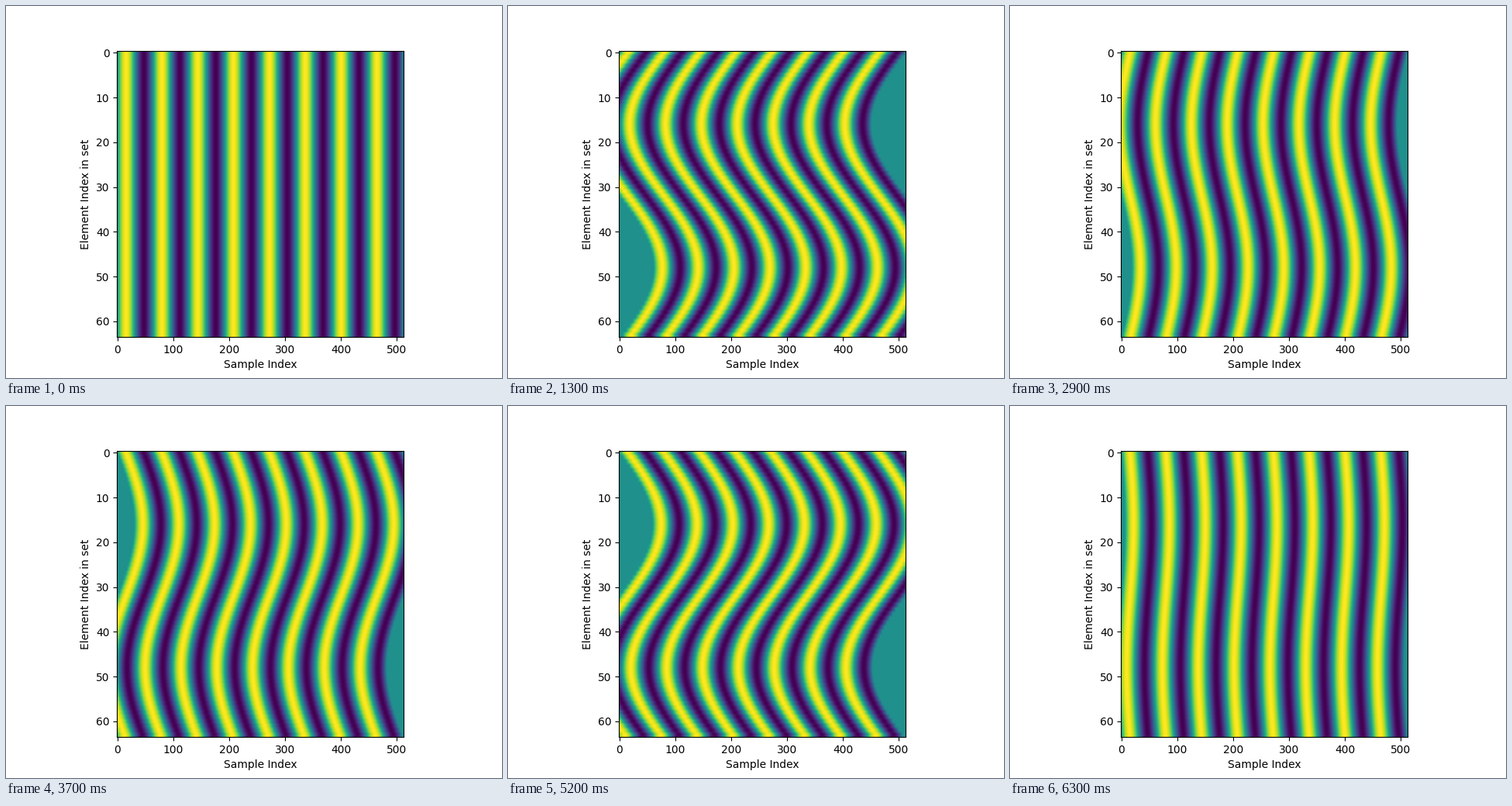
These frames come from a looping animation (640x480 px, 6400 ms). A matplotlib script:

```python
import numpy as np
import matplotlib.pyplot as plt
from matplotlib.animation import FuncAnimation

FRAMES = 64
ELEMENTS = 64
SAMPLES = 512
PERIOD = 64
MAX_DELAY = 64

sample = np.arange(SAMPLES)[None, :]
element = np.arange(ELEMENTS)[:, None]


def wave(frame):
    """Sine burst per element, delayed by a swinging sine profile."""
    swing = -MAX_DELAY * np.sin(2 * np.pi * frame / FRAMES)
    delay = swing * np.sin(2 * np.pi * element / ELEMENTS)
    t = sample - delay
    inside = (t >= 0) & (t < SAMPLES)
    return np.where(inside, np.sin(2 * np.pi * t / PERIOD), 0.0)


fig, ax = plt.subplots(figsize=(6.4, 4.8), dpi=100)
image = ax.imshow(wave(0), cmap="viridis", vmin=-1, vmax=1,
                  aspect=SAMPLES / ELEMENTS)
ax.set_xlabel("Sample Index")
ax.set_ylabel("Element Index in set")


def update(frame):
    image.set_data(wave(frame))
    return [image]


anim = FuncAnimation(fig, update, frames=FRAMES, interval=100, repeat=True)
plt.show()
```
